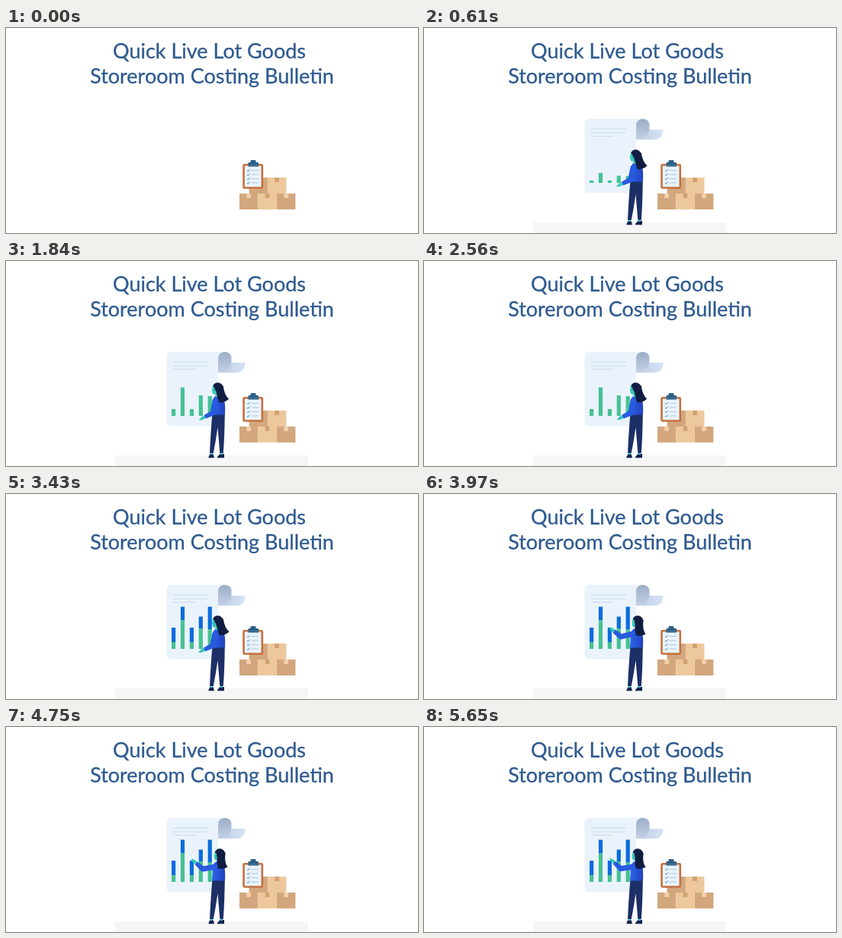
These frames come from a looping animation (540x270 px, 5680 ms). An HTML page:

```html
<!DOCTYPE html>
<html lang="en">
<head>
<meta charset="utf-8">
<title>Storeroom Costing Bulletin</title>
<style>
  html, body { margin: 0; width: 100%; height: 100%; overflow: hidden; background: #fff; }
  svg { display: block; width: 540px; height: 270px; }
  text {
    font: 400 27px Lato, sans-serif; text-anchor: middle;
    fill: #2e5a8f; stroke: #2e5a8f; stroke-width: .3px;
  }
</style>
</head>
<body>
<svg viewBox="0 0 540 270">
  <defs>
    <linearGradient id="curl" x1="0" y1="0" x2="0" y2="1">
      <stop offset="0" stop-color="#9cadc7"/>
      <stop offset="1" stop-color="#c3d1e6"/>
    </linearGradient>
    <linearGradient id="flap">
      <stop offset="0" stop-color="#bccbe2"/>
      <stop offset="1" stop-color="#d6e3f6"/>
    </linearGradient>
    <linearGradient id="shirt">
      <stop offset="0" stop-color="#2a66ea"/>
      <stop offset="1" stop-color="#2340bd"/>
    </linearGradient>
  </defs>

  <text x="266.5" y="40">Quick Live Lot Goods</text>
  <text x="270" y="73">Storeroom Costing Bulletin</text>

  <g id="scene">
    <rect x="143" y="256" width="253" height="14" fill="#f6f6f6"/>
    <path d="M217 119.500H288L278 132V217.500H216Q210.500 217 210.500 211V126Q210.500 120 217 119.500Z" fill="#eaf3fb"/>
    <path d="M278 147V128C278 117 295.500 117 295.500 128V147Z" fill="url(#curl)"/>
    <path d="M278 147Q293 146 295.500 134H313.500Q313 147 302 147Z" fill="url(#flap)"/>
    <path d="M219 133H265M219 138H264M219 142.500H248" stroke="#c9d9ee" fill="none"/>
    <g id="bars"></g>

    <!-- shoes, ankles, trousers -->
    <path d="M267.500 254L265.500 258V259.300H273L271.500 254ZM280.500 254L277 258V259.300H286V254Z" fill="#14224f"/>
    <path d="M269.500 251V255M282.500 251V255" stroke="#35c5b9" stroke-width="3"/>
    <path d="M270.500 201H286.800Q286.500 230 284.800 253H280.300L277.500 219Q275 237 271.800 253H267Q268.500 222 270.500 201Z" fill="#1c2f66"/>

    <path d="M275 177.500Q282 176 285 180Q288 187 287 202.500H269.700Q271 195 270.500 187Q271 180 275 177.500Z" fill="url(#shirt)"/>
    <g id="head">
      <path d="M281 162Q274 161 273.300 166L272.600 170L273.300 174Q274.500 176 277 175.500V179H281Z" fill="#35c5b9"/>
      <path id="tail" d="M-5.500 -1C-3 6 -5.500 14 -4 20Q3 22 9.500 18.500Q5 13 6.500 0Z" fill="#111c41"/>
      <path d="M274 165.500C274.500 158 287 158 287.500 168L276 170Q277.500 166 274 165.500Z" fill="#111c41"/>
    </g>
    <g id="arm">
      <path d="M0 0H16" stroke="#285be0" stroke-width="7" stroke-linecap="round"/>
      <g transform="translate(16.300) rotate(53)">
        <path d="M10 0H15.500" stroke="#35c5b9" stroke-width="4" stroke-linecap="round"/>
        <path d="M15 -1L19 0" stroke="#35c5b9" stroke-width="2" stroke-linecap="round"/>
        <path d="M0 -3.500L11.500 -2.600V2.600L0 3.500Z" fill="#285be0"/>
      </g>
    </g>
  </g>

  <g id="boxes"></g>

  <!-- clipboard -->
  <rect x="311.500" y="180.300" width="24.300" height="30.200" rx="1" fill="#e9f3fb" stroke="#c5703f" stroke-width="2.600"/>
  <path d="M320.500 177V175Q320.500 174 322 174H326Q327.500 174 327.500 175V177H330Q331 177 331 178V182.500H317.500V178Q317.500 177 318.500 177Z" fill="#2c5f86"/>
  <path d="M318 180.500H330.500" stroke="#47799e"/>
  <g id="checks" fill="none"></g>
</svg>

<script>
const LOOP = 5680, INTRO = 100;
const $ = id => document.getElementById(id);

function add(parent, tag, attrs) {
  const el = document.createElementNS("http://www.w3.org/2000/svg", tag);
  for (const k in attrs) el.setAttribute(k, attrs[k]);
  return parent.appendChild(el);
}
const rect = (parent, x, y, width, height, fill) =>
  add(parent, "rect", { x, y, width, height, fill });
const transform = (id, value) => $(id).setAttribute("transform", value);

// a row of three boxes with two stacked on it, shades alternating
for (let row = 0; row < 2; row++) {
  for (let col = 0; col < 3 - row; col++) {
    const x = 306 + 24.5 * col + 12.5 * row, y = 218 - 21 * row;
    rect($("boxes"), x, y, 24.4, 21, col % 2 ? "#edc89d" : "#d3a77e");
    rect($("boxes"), x + 9.3, y, 5.6, 6, col % 2 ? "#d2a070" : "#f4cfab");
  }
}

for (let i = 0; i < 4; i++) {
  const y = 187.5 + i * 5.5;
  add($("checks"), "path", { d: `M316 ${y}l1.300 1.400l2.200 -2.800`, stroke: "#4a86b4" });
  add($("checks"), "path", { d: `M321.500 ${y}H331`, stroke: "#a5c9e2" });
}

// heights of the green and blue parts
const BASE = 204;
const bars = [[9, 19], [37.5, 18], [9, 19], [27, 15.5], [26, 29.5]].map(([low, top], i) => {
  const x = 217 + 11.9 * i;
  return {
    low, top,
    blue: rect($("bars"), x, 0, 5.2, 0, "#0b6bdc"),
    green: rect($("bars"), x, 0, 5.2, 0, "#46c192")
  };
});

function grow(el, bottom, height) {
  el.setAttribute("y", bottom - height);
  el.setAttribute("height", height);
}

function span(t, from, to) {
  const p = Math.min(1, Math.max(0, (t - from) / (to - from)));
  return p * p * (3 - 2 * p);
}

function draw(t) {
  $("scene").style.display = t < INTRO ? "none" : "";

  const green = span(t, 300, 1080), blue = span(t, 2650, 3400);
  for (const b of bars) {
    grow(b.green, BASE, b.low * green);
    grow(b.blue, BASE - b.low, b.top * blue);
  }

  // she turns to the chart while her arm rises to point at it
  const turn = span(t, 3450, 3950), idle = Math.sin(t / 420);
  transform("head", `translate(${2.6 * (turn - 1)})`);
  transform("tail", `translate(281 166) rotate(${(turn - 1) * (15 + idle)})`);
  const lift = 65 * turn + 4 * span(t, 3950, 4500);
  transform("arm", `translate(274 184) rotate(${101 + lift + idle})`);
}

const start = performance.now();
function tick() {
  draw((performance.now() - start) % LOOP);
  requestAnimationFrame(tick);
}
tick();
</script>
</body>
</html>
```
